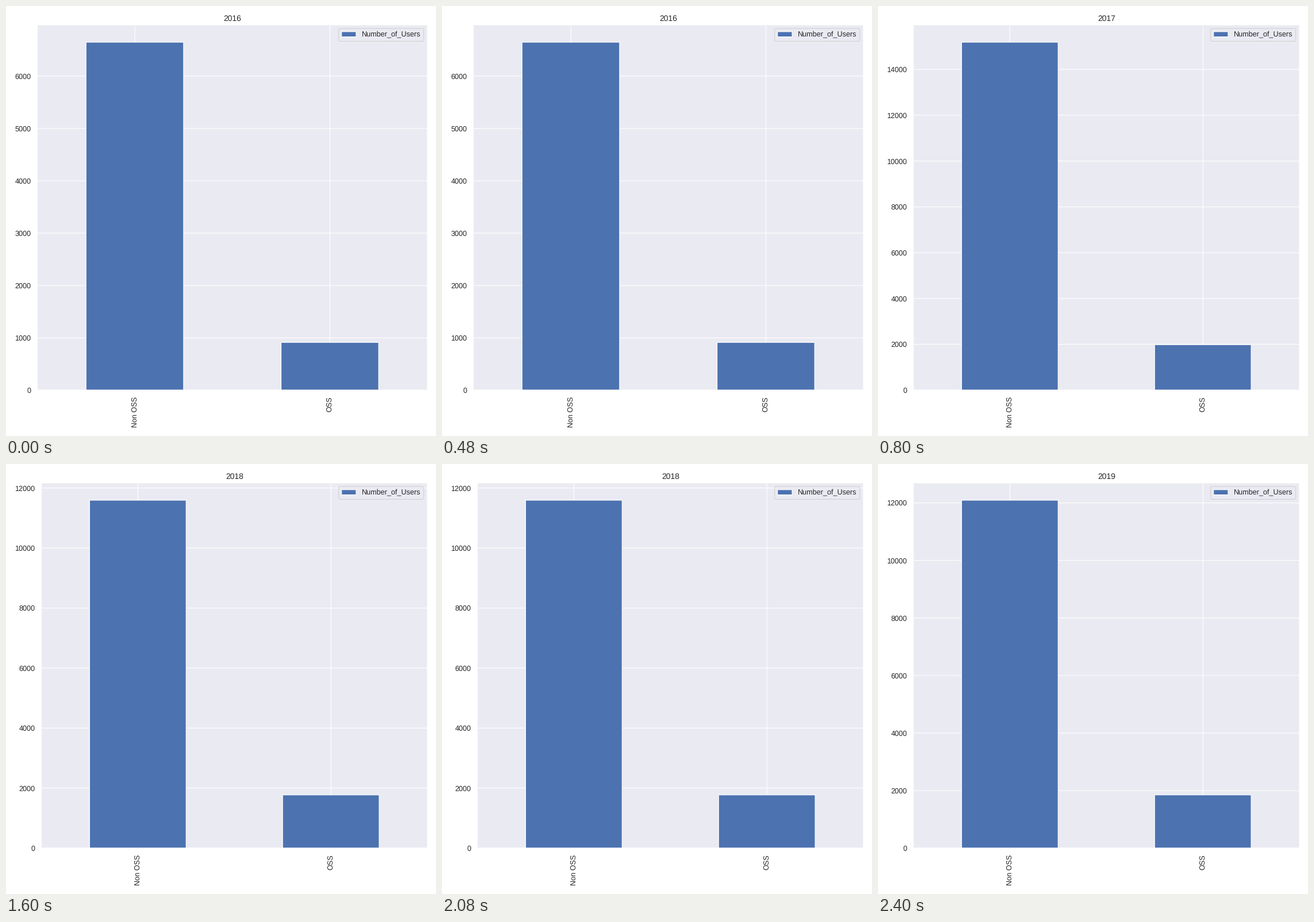
Animation, 748 px wide and 748 px high, one loop 3200 ms. Source, as a matplotlib script:

```python
import matplotlib.pyplot as plt
from matplotlib.animation import FuncAnimation

INCHES = 9
POINTS = INCHES * 72
INK, PANEL, BLUE = "#262626", "#EAEAF2", "#4C72B0"

TITLE, LABEL = 12, 11        # font sizes in points
TITLE_PAD, TICK_PAD = 6, 9.5
MARGIN = 1.08 * TITLE        # white border around everything

USERS = {
    2016: (6648, 912),
    2017: (15185, 1984),
    2018: (11594, 1773),
    2019: (12092, 1850),
}
YEARS = list(USERS)

plt.rcParams.update({
    "font.family": "Liberation Sans",
    "text.color": INK,
    "text.hinting": "none",
    "path.snap": False,
    "axes.axisbelow": True,
    "axes.facecolor": PANEL,
    "axes.edgecolor": "white",
    "axes.linewidth": 1.25,
    "grid.color": "white",
    "grid.linewidth": 1,
    "patch.linewidth": 1,
})

fig = plt.figure(figsize=(INCHES, INCHES), dpi=748 / INCHES, facecolor="white")
ax = fig.add_axes([0.1, 0.1, 0.8, 0.8])


def fit_axes(digits):
    """Leave just enough room for the title and the tick labels."""
    left = MARGIN + TICK_PAD + 0.56 * LABEL * digits
    bottom = MARGIN + TICK_PAD + 4.24 * LABEL
    right = POINTS - MARGIN
    top = POINTS - MARGIN - TITLE_PAD - 0.785 * TITLE
    box = left, bottom, right - left, top - bottom
    ax.set_position([side / POINTS for side in box])


def draw(frame):
    year = YEARS[frame]
    users = USERS[year]
    ax.clear()
    fit_axes(len(str(max(users))))
    ax.bar(range(2), users, width=0.5, color=BLUE, edgecolor="white",
           label="Number_of_Users")
    ax.set_xlim(-0.5, 1.5)
    ax.set_ylim(0, 1.05 * max(users))
    ax.set_xticks(range(2), ["Non OSS", "OSS"], rotation=90)
    ax.tick_params(length=0, pad=TICK_PAD, labelsize=LABEL, labelcolor=INK)
    ax.grid(True)
    ax.set_title(year, fontsize=TITLE, pad=TITLE_PAD)
    ax.legend(loc="upper right", fontsize=LABEL, edgecolor="0.8")
    return []


anim = FuncAnimation(fig, draw, frames=len(YEARS), init_func=lambda: draw(0),
                     interval=800, repeat=True, repeat_delay=0, blit=False)
plt.show()
```
